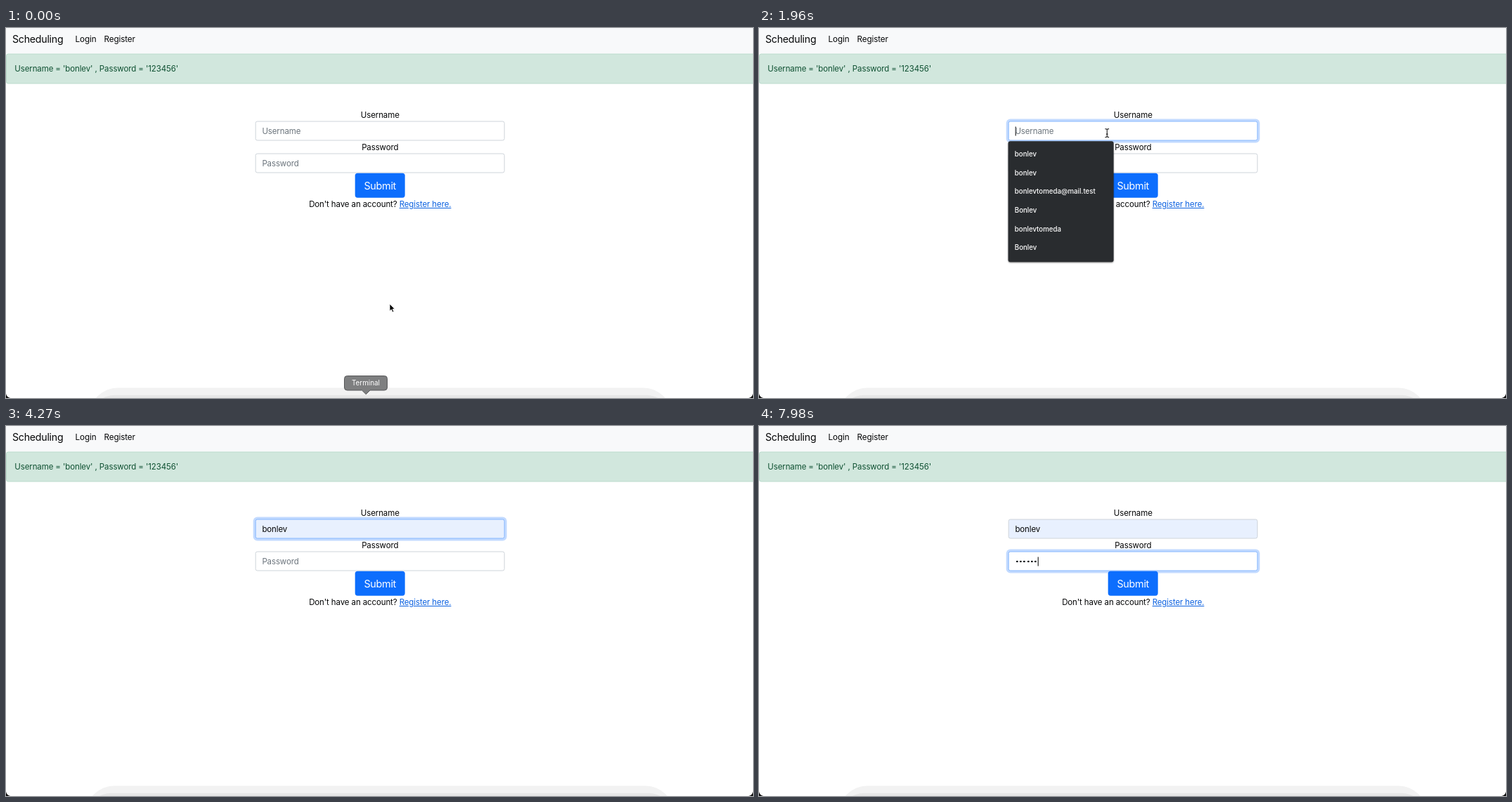
Write an HTML page that moves like this. It is 1063 px wide and 527 px high and loops after 8 s.

```html
<!DOCTYPE html>
<html lang="en">
<head>
<meta charset="utf-8">
<title>Scheduling</title>
<style>
html, body { margin: 0; width: 100%; height: 100%; overflow: hidden; background: #fff; }
body {
  position: relative; color: #050607; white-space: pre;
  font: 11.5px Inter, "Liberation Sans", sans-serif; letter-spacing: -.01em;
}
body * { box-sizing: border-box; }
.abs, .field, .line { position: absolute; }
.line { line-height: 18px; height: 18px; }
.mid { left: 332.3px; width: 400px; text-align: center; }
.nav { left: 0; top: 0; width: 100%; height: 36px; background: #f8f9fa; }
.brand { left: 9px; top: 7px; font-size: 14.2px; letter-spacing: -.018em; }
.item { top: 7px; font-size: 11.7px; }
.alert {
  left: 0; top: 36px; width: 1080px; height: 43px; color: #0f5132; transform: translateY(.5px);
  background: #d1e7dd; border: 1px solid #badbcc; border-radius: 3px;
}
.field {
  left: 354px; width: 355px; height: 28px; padding-left: 8.7px; transform: translate(.7px, .5px);
  line-height: 26px; border: 1px solid #ced4da; border-radius: 3px; background: #fff;
}
.hint { position: absolute; color: #6c757d; }
.caret { display: inline-block; width: 1px; height: 13px; margin-right: -1px; background: #000; vertical-align: -2.5px; }
.preview { font-size: 9.6px; font-weight: 500; letter-spacing: 0; }
.dots i {
  display: inline-block; width: 5.35px; height: 3px; vertical-align: 2px;
  background: radial-gradient(circle at 2.6px 1.5px, #1b1e21 1.1px, transparent 1.7px);
}
.submit {
  left: 496px; top: 206px; width: 71px; height: 35px; border-radius: 3.6px;
  transform: translate(.7px, .7px);
  background: #0d6efd; color: #fff; text-align: center; line-height: 35px;
  font-size: 14.4px; letter-spacing: -.02em;
}
.link { color: #0d62e0; text-decoration: underline; }
.list {
  left: 354px; top: 161px; height: 172px; padding-top: 6.2px; border-radius: 3px;
  transform: translate(.6px, .3px);
  background: #292c2f; color: #fff; overflow: hidden;
  box-shadow: 0 1px 2px rgba(0,0,0,.5);
  font-size: 9.7px; font-weight: 500; letter-spacing: 0;
}
.list div { height: 26.6px; line-height: 26.6px; padding-left: 9.2px; }
.list .on { background: #434548; }
.corner { bottom: 0; width: 7px; height: 7px; }
svg { position: absolute; left: 0; top: 0; }
</style>
</head>
<body>
<div class="abs nav"></div>
<div class="line brand">Scheduling</div>
<div class="line item" style="left:98.5px">Login</div>
<div class="line item" style="left:139.5px">Register</div>
<div class="abs alert"></div>
<div class="line" style="left:12.3px;top:49px;color:#0f5132">Username = 'bonlev' , Password = '123456'</div>

<div class="line mid" style="top:115px">Username</div>
<div class="line mid" style="top:161px">Password</div>
<div class="field" id="user" style="top:132px"><span class="hint">Username</span><span class="text"></span><span class="caret"></span></div>
<div class="field" id="pass" style="top:178px"><span class="hint">Password</span><span class="text dots"></span><span class="caret"></span></div>
<div class="abs submit">Submit</div>
<div class="line mid" style="top:242.4px">Don't have an account? <span class="link">Register here.</span></div>
<div class="abs list" id="list"></div>

<svg width="1063" height="527">
  <rect id="outer" y="512.4" height="80" rx="40" fill="#f2f2f2"/>
  <rect id="inner" y="522.8" height="80" rx="36" fill="#e6e6e6"/>
  <g id="tip">
    <path d="M485.5 495.5H538.5Q542.5 495.5 542.5 499.5V512Q542.5 516 538.5 516H518L512.3 521.7L506.5 516H485.5Q481.5 516 481.5 512V499.5Q481.5 495.5 485.5 495.5Z" fill="#7e7f80" stroke="#58595a"/>
    <text x="512" y="509.2" fill="#fff" font-size="9.9" text-anchor="middle" letter-spacing="0">Terminal</text>
  </g>
  <g id="pointer">
    <path id="arrow" d="M0 0V10.2L2.4 8L4 11.7L5.8 10.9L4.2 7.3H7.2Z" fill="#000" stroke="#fff" stroke-width=".8"/>
    <circle id="ring" r="12" fill="#fff" stroke="#111" stroke-width="1.5"/>
    <path id="beam" d="M-2.8 -6Q0 -6 0 -4.5Q0 -6 2.8 -6M0 -4.5V4.5M-2.8 6Q0 6 0 4.5Q0 6 2.8 6M-1.3 1.5H1.3" fill="none" stroke="#222" stroke-width="1.1"/>
  </g>
</svg>
<div class="abs corner" style="left:0;background:radial-gradient(circle at 100% 0,transparent 6.5px,#111 7.3px)"></div>
<div class="abs corner" style="right:0;background:radial-gradient(circle at 0 0,transparent 6.5px,#111 7.3px)"></div>

<script>
const LOOP = 8000, STEP = 70;
const NAME = 'bonlev', MAIL = 'bonlevtomeda@mail.test';
const NAME_KEYS = [2730, 2870, 3010, 3150, 3290, 3500];
const PASS_KEYS = [5320, 5740, 6090, 6300, 6580, 6930];
const SHORT = [NAME, NAME, MAIL, 'Bonlev', 'bonlevtomeda', 'Bonlev'];
const FULL = [...SHORT.slice(0, 5), 'bonlevtomeda47@mail.test'];

const $ = id => document.getElementById(id);
const show = (el, on) => { el.style.visibility = on ? 'visible' : 'hidden'; };
const within = (t, a, b) => t >= a && t < b;
const ramp = (t, a, d) => Math.min(1, Math.max(0, (t - a) / d));
const typed = (t, keys) => keys.filter(k => t >= k).length;
const mix = (a, b, k) => a.map((v, i) => v + (b[i] - v) * k);

function setField(el, html, hint, caret, glow) {
  const text = el.querySelector('.text');
  if (text.innerHTML !== html) text.innerHTML = html;
  show(el.querySelector('.hint'), hint);
  show(el.querySelector('.caret'), caret);
  el.style.borderColor = `rgb(${mix([206, 212, 218], [134, 183, 254], glow)})`;
  el.style.boxShadow = `0 0 0 ${2.95 * glow}px rgba(13,110,253,${0.25 * glow})`;
}

function setList(t) {
  const items = t < 2870 ? SHORT : FULL, lit = t >= 4130;
  const html = items.map((s, i) => `<div${lit && !i ? ' class="on"' : ''}>${s}</div>`).join('');
  const list = $('list');
  if (list.dataset.html !== html) list.innerHTML = list.dataset.html = html;
  list.style.width = (t < 2870 ? 150 : 160) + 'px';
  show(list, within(t, 1960, 4270));
}

function pointerAt(t) {
  if (t >= 1750) return [495.3, 149.6];
  if (t >= 1680) return [512, 150];
  if (t >= 910) return [531, 150];
  const k = ramp(t, 350, 420), n = 1 - k;
  const curve = (a, b, c, d) => n*n*n*a + 3*n*n*k*b + 3*n*k*k*c + k*k*k*d;
  return [curve(546, 640, 640, 524), curve(393, 340, 150, 156)];
}

function setDock(left, right) {
  for (const id of ['outer', 'inner']) {
    $(id).setAttribute('x', left);
    $(id).setAttribute('width', right - left);
  }
}

function draw(ms) {
  const t = Math.floor(ms / STEP) * STEP;

  show($('tip'), t < 70);
  t < 70 ? setDock(119, 947) : setDock(114, 950);

  const n = typed(t, NAME_KEYS);
  const user = $('user');
  setField(user, NAME.slice(0, n), !n,
    within(t, 1820, 2380) || within(t, 2730, 3990),
    ramp(t, 1820, 140) - ramp(t, 4270, 140));
  user.style.background = t >= 4130 ? '#e8f0fe' : '#fff';
  user.querySelector('.text').classList.toggle('preview', within(t, 4130, 4270));

  const p = typed(t, PASS_KEYS);
  setField($('pass'), '<i></i>'.repeat(p), !p,
    within(t, 4340, 4830) || within(t, 5320, 7420) || t >= 7980,
    ramp(t, 4270, 140));

  setList(t);

  const [x, y] = pointerAt(t);
  const beam = y < 160, seen = t < 2730;
  $('pointer').setAttribute('transform', `translate(${x} ${y})`);
  show($('arrow'), seen && !beam);
  show($('beam'), seen && beam);
  show($('ring'), within(t, 1820, 1890));
}

const start = performance.now();
function tick() {
  draw((performance.now() - start) % LOOP);
  requestAnimationFrame(tick);
}
tick();
</script>
</body>
</html>
```
